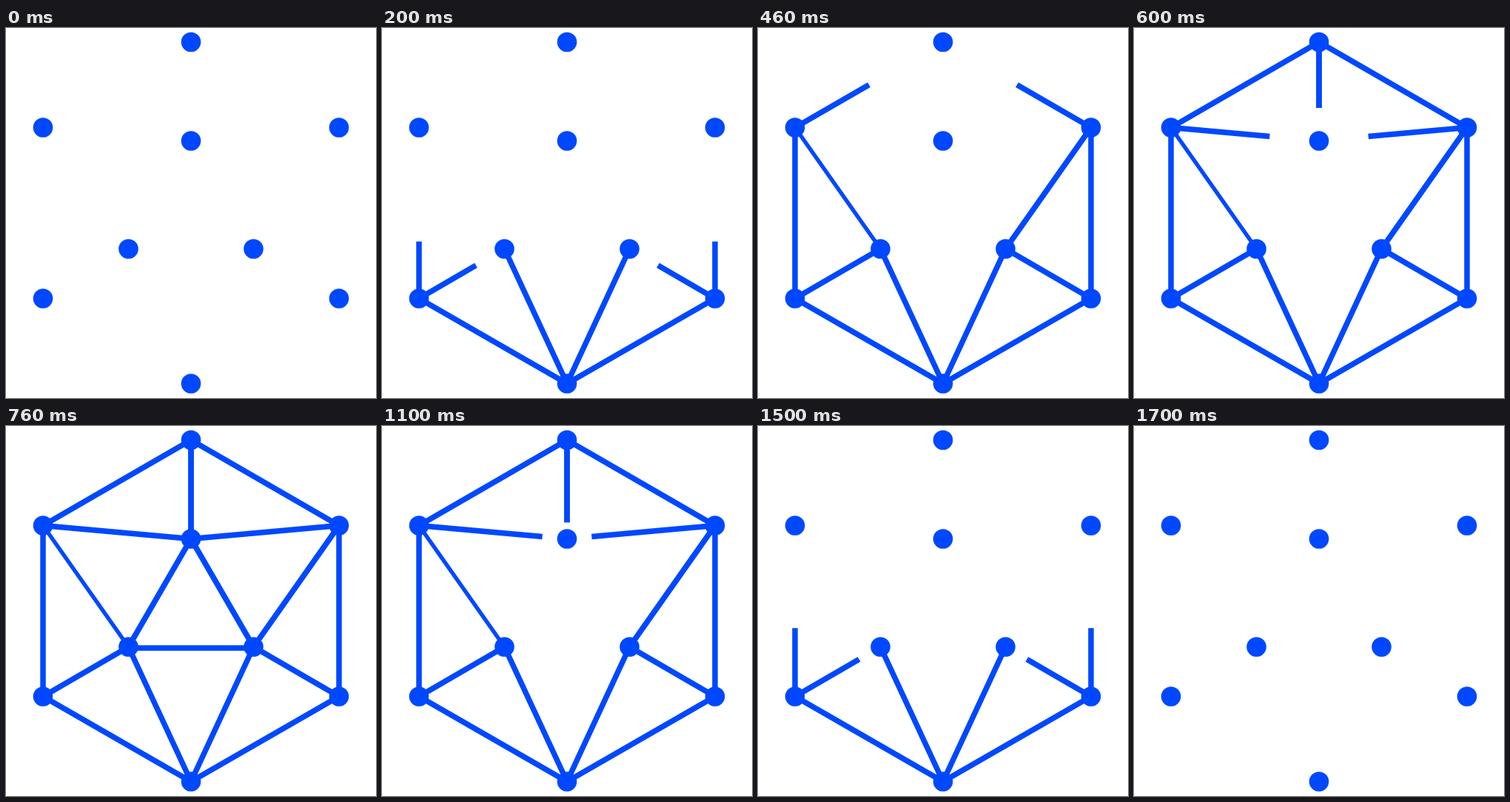
These frames come from a looping animation (500 by 500 pixels, 1800 ms). An HTML page with a canvas:

```html
<!DOCTYPE html>
<html lang="en">
<head>
<meta charset="utf-8">
<title>Icosahedron</title>
<style>
  html, body { margin: 0; height: 100%; overflow: hidden; background: #fff; }
  canvas { display: block; width: 500px; height: 500px; }
</style>
</head>
<body>
<canvas id="stage" width="500" height="500"></canvas>
<script>
const ctx = document.getElementById('stage').getContext('2d');
const LOOP = 1800, STEP = 20, BLUE = '#0048ff', WIDTH = 7.5;

// Left half of the figure; the right half mirrors it about x = 250.
const apex = [250, 19], base = [250, 480.5], hub = [250, 152.5];
const upper = [50, 134.5], lower = [50, 365.5], knee = [165.5, 298.5];

// Stages: [draw start, draw duration, erase start, erase duration] in ms
const fan = [0, 160, 1540, 160];
const side = [160, 120, 1440, 100];
const spur = [160, 60, 1480, 80];
const diagonal = [280, 120, 1320, 120];
const roof = [400, 120, 1200, 120];
const spokes = [520, 120, 1080, 120];
const core = [640, 120, 960, 120];

const edges = [
  [base, lower, fan], [base, knee, fan],
  [lower, upper, side], [lower, knee, spur],
  [upper, knee, diagonal, 5.5],
  [upper, apex, roof],
  [upper, hub, spokes], [apex, hub, spokes],
  [hub, knee, core], [[165.5, 300], [250, 300], core]
];

const clamp = v => Math.max(0, Math.min(1, v));
const mirror = ([x, y]) => [500 - x, y];

function line([x1, y1], [x2, y2], amount, width) {
  ctx.lineWidth = width;
  ctx.beginPath();
  ctx.moveTo(x1, y1);
  ctx.lineTo(x1 + (x2 - x1) * amount, y1 + (y2 - y1) * amount);
  ctx.stroke();
}

function dot([x, y]) {
  ctx.beginPath();
  ctx.arc(x, y, 13.3, 0, 2 * Math.PI);
  ctx.fill();
}

function draw(t) {
  ctx.clearRect(0, 0, 500, 500);
  ctx.fillStyle = ctx.strokeStyle = BLUE;
  for (const [from, to, [start, grow, end, shrink], leftWidth = WIDTH] of edges) {
    const amount = clamp((t - start) / grow) - clamp((t - end) / shrink);
    if (amount <= 0) continue;
    line(from, to, amount, leftWidth);
    line(mirror(from), mirror(to), amount, WIDTH);
  }
  [apex, base, hub].forEach(dot);
  for (const p of [upper, lower, knee]) { dot(p); dot(mirror(p)); }
}

const origin = performance.now();
function frame() {
  const t = (performance.now() - origin) % LOOP;
  draw(t - t % STEP);
  requestAnimationFrame(frame);
}
frame();
</script>
</body>
</html>
```
